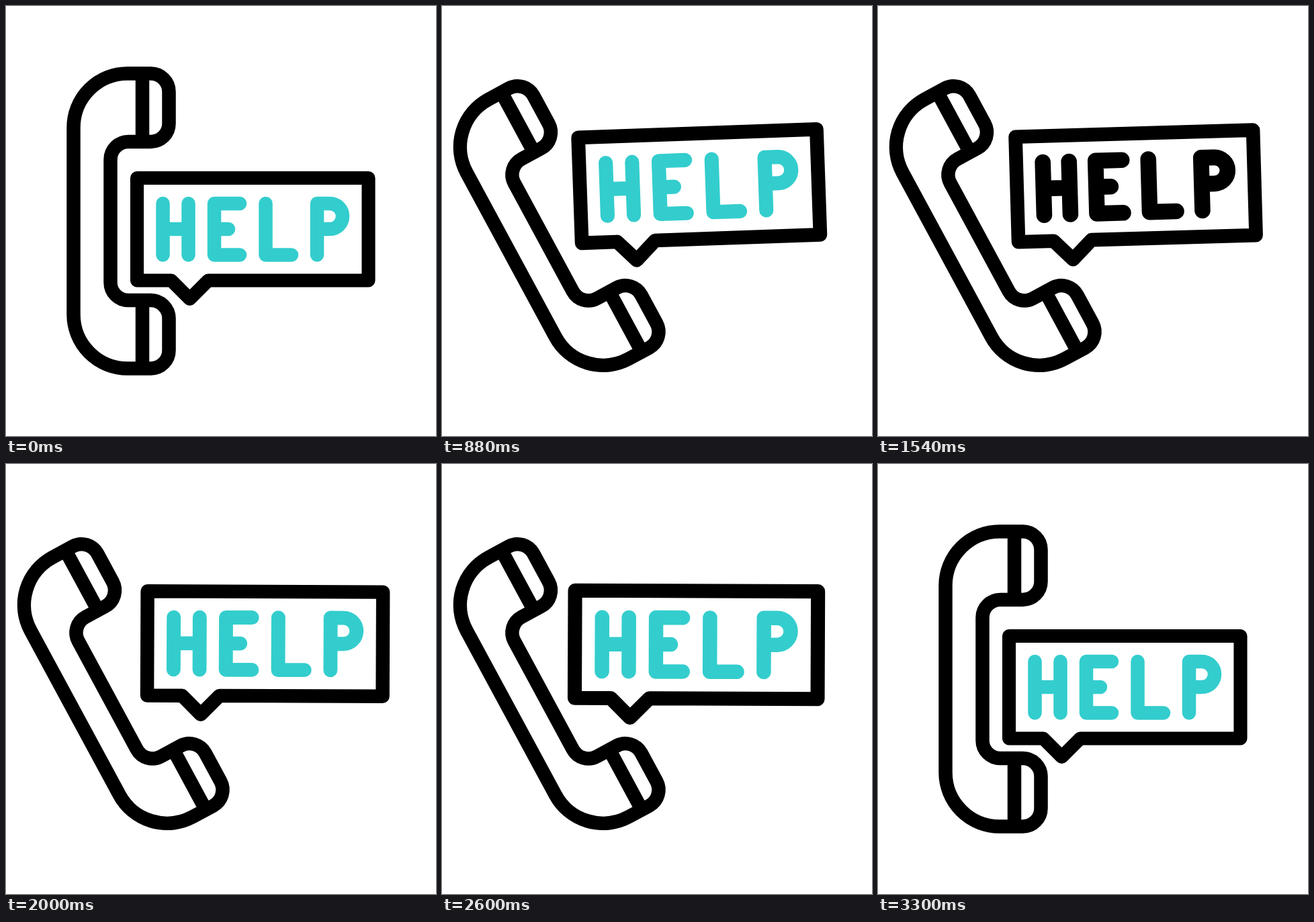
These frames come from a looping animation (640x640 px, 3600 ms). An HTML page with a canvas:

```html
<!DOCTYPE html>
<html lang="en">
<head>
<meta charset="utf-8">
<title>Help line</title>
<style>
  html, body { margin: 0; width: 100%; height: 100%; overflow: hidden; background: #fff; }
  canvas { display: block; width: 100vmin; height: 100vmin; }
</style>
</head>
<body>
<canvas id="stage" width="640" height="640"></canvas>
<script>
const ctx = document.getElementById('stage').getContext('2d');
const LOOP = 3600;
const BLACK = '#000';
const TEAL = '#33cdcd';
const PHONE_CENTER = [181, 320];
const BUBBLE_CENTER = [367.25, 332.25];

const handset = new Path2D(
  'M181 100.5H215.5A27 27 0 0 1 242.5 127.5V175A27 27 0 0 1 215.5 202H182' +
  'A26.5 26.5 0 0 0 155.5 228.5V411.5A26.5 26.5 0 0 0 182 438H215.5' +
  'A27 27 0 0 1 242.5 465V512.5A27 27 0 0 1 215.5 539.5H181' +
  'A80.5 80.5 0 0 1 100.5 459V181A80.5 80.5 0 0 1 181 100.5Z' +
  'M203 102V201M203 439V538');
const bubble = new Path2D(
  'M195 256H539.5V408.5H301L273.5 436L246 408.5H195Z');
const letters = new Path2D(
  'M233.5 294V370.5M271.5 294V370.5M233.5 332H271.5' +
  'M348 294H310V370.5H348M310 332H331' +
  'M386.5 294V370.5H425' +
  'M463 370.5V294H482A19 19 0 0 1 482 332H463');

// Eased interpolation through [time, value] keys.
function track(keys, t) {
  if (t <= keys[0][0]) return keys[0][1];
  for (let i = 1; i < keys.length; i++) {
    const [t0, v0] = keys[i - 1];
    const [t1, v1] = keys[i];
    if (t < t1) {
      const u = (t - t0) / (t1 - t0);
      return v0 + (v1 - v0) * u * u * (3 - 2 * u);
    }
  }
  return keys[keys.length - 1][1];
}

const lift = [[0, 0], [600, 1], [2700, 1], [3300, 0]];
const grow = [[600, 0], [1200, 0.067], [1800, 0], [2400, 0.067], [3000, 0]];
const tilt = [[0, 0]];
for (let i = 0; i < 8; i++) tilt.push([600 + 300 * i, i % 2 ? -2.1 : 7]);
tilt.push([3300, 0]);

function place([cx, cy], dx, dy, degrees, scale, draw) {
  ctx.save();
  ctx.translate(cx + dx, cy + dy);
  ctx.rotate(degrees * Math.PI / 180);
  ctx.scale(scale, scale);
  ctx.translate(-cx, -cy);
  draw();
  ctx.restore();
}

function stroke(path, color, width, cap) {
  ctx.strokeStyle = color;
  ctx.lineWidth = width;
  ctx.lineCap = cap;
  ctx.stroke(path);
}

function render(t) {
  ctx.fillStyle = '#fff';
  ctx.fillRect(0, 0, 640, 640);
  ctx.lineJoin = 'round';

  const k = track(lift, t);
  const g = track(grow, t);
  const flash = t >= 1520 && t < 1580;

  place(PHONE_CENTER, -7.4 * k ** 2.5, 12 * k, -28.4 * k, 1,
    () => stroke(handset, BLACK, 20.5, 'butt'));

  place(BUBBLE_CENTER, 22.2 * k - 220 * g, -65.5 * k + 45 * g, track(tilt, t), 1 + g, () => {
    stroke(bubble, BLACK, 20.1, 'butt');
    // The dark flash also thickens the letters.
    if (flash) stroke(letters, BLACK, 23, 'round');
    else stroke(letters, TEAL, 20.5, 'round');
  });
}

function tick() {
  render(performance.now() % LOOP);
  requestAnimationFrame(tick);
}
tick();
</script>
</body>
</html>
```
